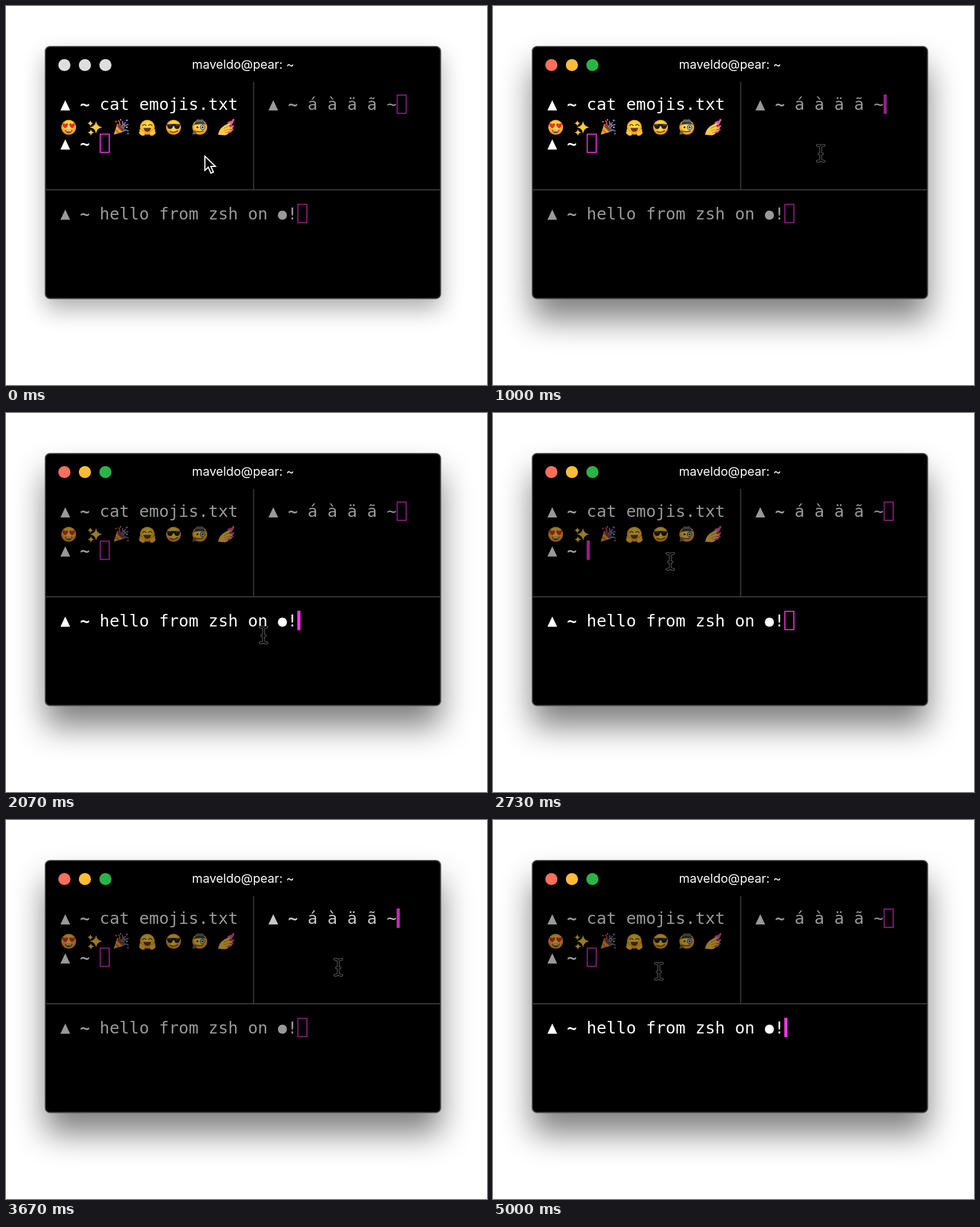
Write an HTML page that moves like this. It is 844 by 664 pixels and loops after 5.07 s.

```html
<!DOCTYPE html>
<html lang="en">
<head>
<meta charset="utf-8">
<title>Split terminal</title>
<style>
  html, body { margin: 0; width: 100%; height: 100%; overflow: hidden; background: #fff; }
  svg { display: block; width: 844px; height: 664px; }
  text { white-space: pre; }
  .mono { font: 28.8px "DejaVu Sans Mono", "Liberation Mono", monospace; fill: #fff; }
  .bold { font-weight: bold; }
  .title { font: 21.5px Inter, Roboto, sans-serif; fill: #fff; text-anchor: middle; }
</style>
</head>
<body>
<svg viewBox="0 0 844 664" xmlns="http://www.w3.org/2000/svg">
  <defs>
    <filter id="wide" x="-30%" y="-40%" width="160%" height="180%"><feGaussianBlur stdDeviation="28"/></filter>
    <filter id="soft" x="-30%" y="-40%" width="160%" height="180%"><feGaussianBlur stdDeviation="20"/></filter>
    <radialGradient id="skin" cy="42%">
      <stop offset="0" stop-color="#ffe75c"/><stop offset=".65" stop-color="#ffcf35"/><stop offset="1" stop-color="#ef9a1c"/>
    </radialGradient>
    <path id="heart" d="M0 5C-6 1-6-4-3-4Q-.6-4 0-2Q.6-4 3-4C6-4 6 1 0 5Z" fill="#ea2f2c"/>
    <path id="star" d="M0-1Q.12-.12 1 0Q.12.12 0 1Q-.12.12-1 0Q-.12-.12 0-1Z" fill="#ffcb3d"/>
    <path id="beam" d="M-6-14Q0-14 0-10Q0-14 6-14M0-10V10M-6 14Q0 14 0 10Q0 14 6 14M-3 1H3"/>
  </defs>

  <rect id="shadowOn" x="69" y="106" width="694" height="443" rx="8" opacity=".5" filter="url(#wide)"/>
  <rect id="shadowOff" x="69" y="88" width="694" height="443" rx="8" opacity=".32" filter="url(#soft)"/>
  <rect x="69" y="71" width="693.5" height="441.5" rx="8" stroke="#484848" stroke-width="2"/>
  <path d="M434.5 133V321M70 322H762" stroke="#393939" stroke-width="2" fill="none"/>
  <g id="lights"></g>
  <text class="title" x="416" y="110">maveldo@pear: ~</text>
  <g id="panes"></g>

  <path id="arrow" d="M0 1V26L6 20.500L10.500 31L15 29L10.500 19H18.500Z" fill="#000" stroke="#fff" stroke-width="2"/>
  <g id="ibeam" fill="none" stroke-linecap="round">
    <use href="#beam" stroke="#666" stroke-width="4.600"/>
    <use href="#beam" stroke="#000" stroke-width="2.400"/>
  </g>
</svg>
<script>
const LOOP = 5070, COL = 17.34, DIM = 0.6, PINK = '#fa36e9';
const ACTIVATE = 200, FIRST_FOCUS = 400;
const byId = id => document.getElementById(id);

const face = extra => `<circle r="13" fill="url(#skin)"/>${extra}`;
const brown = (d, w = 1.6) => `<path d="${d}" fill="none" stroke="#6b3a0c" stroke-width="${w}" stroke-linecap="round"/>`;
const star = (x, y, s) => `<use href="#star" transform="translate(${x} ${y}) scale(${s})"/>`;
const heart = x => `<use href="#heart" transform="translate(${x} -3)"/>`;
const dot = (x, y, r, color) => `<circle cx="${x}" cy="${y}" r="${r}" fill="${color}"/>`;

const emojis = [
  face(heart(-6) + heart(6) + '<path d="M-7 4Q0 6 7 4Q5 10 0 10T-7 4Z" fill="#70350e"/><path d="M-5 5Q0 6 5 5L4 7H-4Z" fill="#fff"/>'),
  star(2, 0, 11) + star(-8, -7, 5.5) + star(-7, 9, 6),
  `<path d="M-13 13L-7-6Q3-2 7 7Z" fill="#eda23a"/>
   <path d="M-10 4L-4 10M-8-3L3 8" stroke="#b96820" stroke-width="2"/>
   <ellipse cx="0" cy="1" rx="3.500" ry="9" transform="rotate(-45)" fill="#7b3b35"/>
   <path d="M0 0Q5-4 2-11M3 2Q7-4 13-5M4 6Q9 3 13 7" fill="none" stroke="#4b8bd2" stroke-width="2"/>
   <path d="M-3-4Q-1-8-5-12M2-2L8-9" fill="none" stroke="#df4164" stroke-width="2.200"/>`
   + dot(-9, -10, 1.5, '#e84b45') + dot(10, -12, 1.8, '#4593df') + dot(10, 0, 1.5, '#e9be38')
   + dot(6, -4, 1.3, '#64b54c') + dot(-1, -13, 1.2, '#e9be38') + dot(12, 11, 1.5, '#e5496c'),
  face(brown('M-8-3Q-5-7-2-3M2-3Q5-7 8-3') + '<path d="M-7 1H7Q5 8 0 8T-7 1Z" fill="#70350e"/>')
   + [-1, 1].map(s => `<path transform="scale(${s} 1)" d="M4 10Q3 6 7 7L12 3Q15 4 13 7Q16 9 13 12Q9 16 5 14Z" fill="#ffc938" stroke="#d98b20"/>`).join(''),
  face(`<path d="M-12-5Q0-7 12-5L11-2Q10 3 6 3Q2 3 1-2H-1Q-2 3-6 3Q-10 3-11-2Z" fill="#211d20"/>
   <path d="M-9-4L-4-4M4-4H9" stroke="#66646b"/>` + brown('M-6 7Q0 11 7 6')),
  face(dot(-4, 0, 1.8, '#4a2810') + '<circle cx="5" cy="0" r="4" fill="#cbe0df" stroke="#4c4a45" stroke-width="1.500"/>'
   + dot(5, 0, 1.8, '#4a2810') + brown('M-5 7Q1 9 6 6'))
   + `<path d="M-14-3Q-9-6-8-8Q-7-15-2-14Q0-13 3-14Q7-15 8-8Q10-6 14-4Q0-7-14-3Z" fill="#67645a"/>
   <path d="M-8-8Q0-10 8-8L9-6Q0-8-9-5Z" fill="#302d29"/>
   <path d="M-13 13Q-12 5-8 5Q-5 7-6 12Z" fill="#6d6350"/>`,
  `<path d="M-14 13Q-12 2-3-3L8-9Q11-9 10-6L5-2L12-1Q13 2 9 3L11 6Q9 9 6 8Q4 13-2 14Z" fill="#ffca45"/>
   <path d="M-4 2L5-2M-3 6L8 3M-2 10L6 8" stroke="#c98424" stroke-width="1.200"/>
   <path d="M4-8L9-10M8-1L13-2M8 4L12 4M4 9L8 8" stroke="#df4d9a" stroke-width="3" stroke-linecap="round"/>
   <path d="M9-5L13-13" stroke="#e45aa4" stroke-width="3.500" stroke-linecap="round"/>`
];

const textAt = (x, top, col, str, cls = '') =>
  `<text class="mono ${cls}" x="${x + col * COL}" y="${top + 27.5}">${str}</text>`;
const prompt = (x, top) =>
  `<path d="M${x + 0.5} ${top + 28.5}h17l-8.500-18z" fill="#fff"/>` + textAt(x, top, 2, '~', 'bold');
const caret = (x, top, col) => {
  const left = x + col * COL;
  return `<rect class="box" x="${left + 1}" y="${top + 1.5}" width="15.800" height="32" fill="none" stroke="${PINK}" stroke-width="1.800"/>
    <rect class="bar" x="${left}" y="${top + 0.5}" width="5.500" height="34" fill="${PINK}"/>`;
};

const LEFT = 0, RIGHT = 1, BOTTOM = 2;
const paneMarkup = [
  prompt(95, 154.5) + textAt(95, 154.5, 4, 'cat emojis.txt')
    + emojis.map((e, i) => `<g transform="translate(${110 + i * 46} 212.500)">${e}</g>`).join('')
    + prompt(95, 223) + caret(95, 223, 4),
  prompt(460, 154.5) + textAt(460, 154.5, 4, 'á à ä ã ~') + caret(460, 154.5, 13),
  prompt(95, 346) + textAt(95, 346, 4, 'hello from zsh on')
    + dot(485, 366.5, 8, '#fff') + textAt(95, 346, 23, '!') + caret(95, 346, 24)
];
byId('panes').innerHTML = paneMarkup.map(m => `<g>${m}</g>`).join('');
byId('lights').innerHTML = [0, 1, 2].map(i => dot(102.5 + 36 * i, 103.5, 10.6, '#dedede')).join('');

const panes = [...byId('panes').children].map(node => ({
  node, box: node.querySelector('.box'), bar: node.querySelector('.bar')
}));
const lights = [...byId('lights').children];
const lightColors = ['#ff6f5b', '#ffbc38', '#2ab446'];

const clicks = [
  { at: -1000, pane: LEFT }, { at: 1000, pane: RIGHT }, { at: 1800, pane: BOTTOM },
  { at: 2720, pane: LEFT }, { at: 3537, pane: RIGHT }, { at: 4400, pane: BOTTOM }
];
// Pointer stops: time, x, y
const path = [
  [0, 349, 262], [200, 349, 262], [320, 344, 258], [450, 344, 258], [930, 575, 258], [1080, 575, 258],
  [1600, 466, 402], [1950, 466, 402], [2600, 311, 260], [2860, 311, 260],
  [3450, 583, 258], [3750, 583, 258], [4300, 556, 429], [4560, 556, 429], [5000, 291, 265], [LOOP, 291, 265]
];

const clamp = v => Math.min(1, Math.max(0, v));
const smooth = v => v * v * (3 - 2 * v);
const show = (node, on) => node.setAttribute('visibility', on ? 'visible' : 'hidden');

function pointerAt(t) {
  const i = path.findIndex(stop => stop[0] > t);
  const [t0, x0, y0] = path[i - 1], [t1, x1, y1] = path[i];
  const k = smooth((t - t0) / (t1 - t0));
  return [x0 + (x1 - x0) * k, y0 + (y1 - y0) * k];
}

// The old pane dims at once; the new one then fades in.
function paneOpacity(pane, current, previous, age) {
  if (pane === current.pane) return DIM + (1 - DIM) * clamp((age - 80) / 120);
  return previous && pane === previous.pane && age < 60 ? 1 : DIM;
}

function draw(t) {
  const active = t >= ACTIVATE;
  show(byId('shadowOn'), active);
  show(byId('shadowOff'), !active);
  show(byId('arrow'), !active);
  show(byId('ibeam'), active);
  lights.forEach((light, i) => light.setAttribute('fill', active ? lightColors[i] : '#dedede'));

  const index = clicks.filter(c => c.at <= t).length - 1;
  const current = clicks[index];
  panes.forEach(({ node, box, bar }, i) => {
    const focused = t >= FIRST_FOCUS && i === current.pane;
    node.setAttribute('opacity', paneOpacity(i, current, clicks[index - 1], t - current.at));
    show(bar, focused);
    show(box, !focused);
  });

  const place = `translate(${pointerAt(t).join(' ')})`;
  byId('arrow').setAttribute('transform', place);
  byId('ibeam').setAttribute('transform', place);
}

const start = performance.now();
function tick() {
  draw((performance.now() - start) % LOOP);
  requestAnimationFrame(tick);
}
tick();
</script>
</body>
</html>
```
